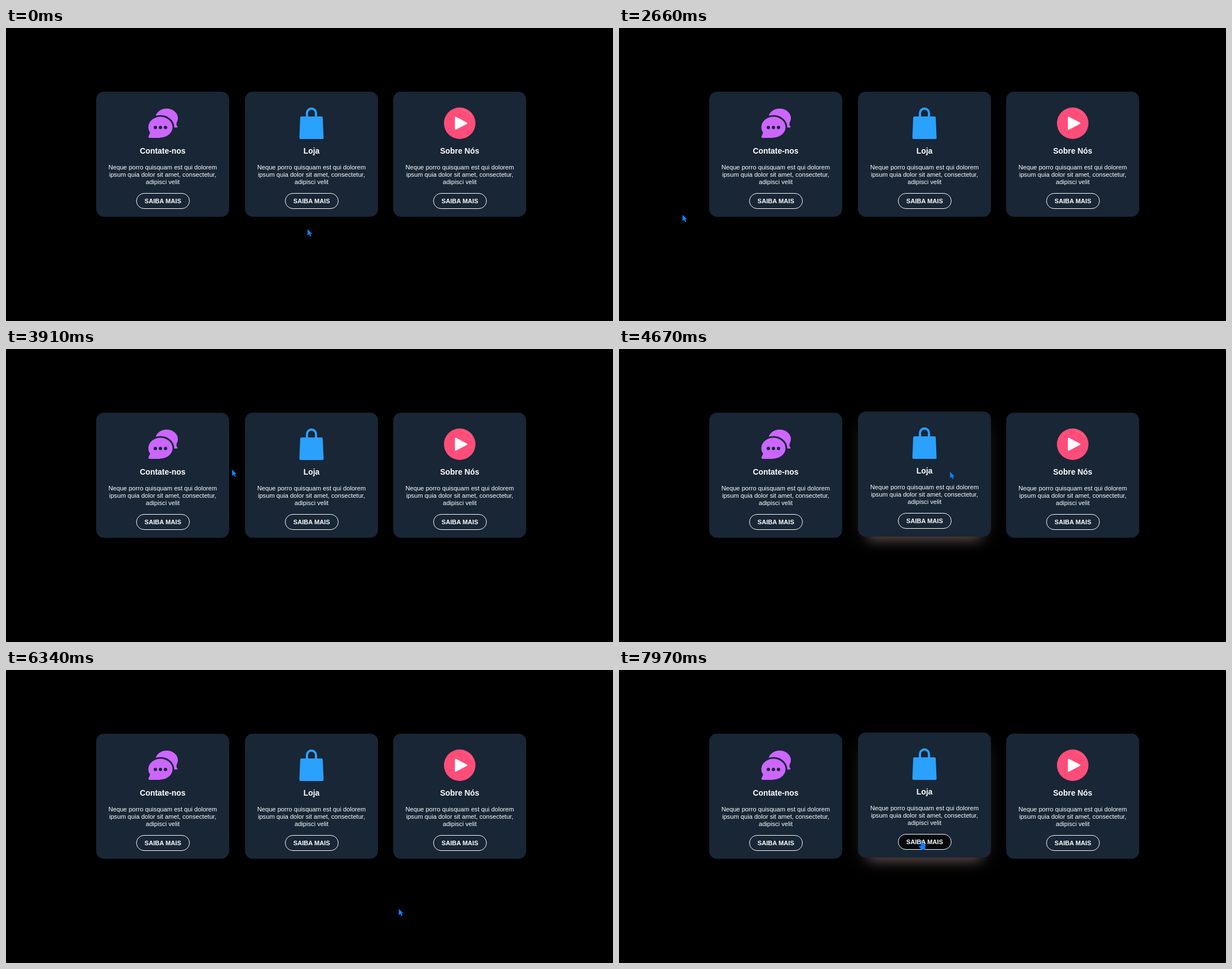
Recreate the animation shown at these times as an HTML page. Size 1077 by 520 pixels, loop 8000 ms.

```html
<!DOCTYPE html>
<html lang="pt">
<head>
<meta charset="utf-8">
<style>
  html, body { margin: 0; width: 100%; height: 100%; overflow: hidden; background: #000; }
  .card { position: absolute; top: 113px; width: 236px; height: 222px; border-radius: 14px; background: #182636; }
  .card svg { display: block; }
  text { font-family: "Liberation Sans", Arial, sans-serif; font-size: 11.15px; fill: #fff; text-anchor: middle; }
  .title { font-size: 13.9px; }
  .title, .label { font-weight: bold; }
  #pointer { position: absolute; left: 0; top: 0; z-index: 1; overflow: visible; }
</style>
</head>
<body>
<svg id="pointer" width="20" height="20" fill="#0a84ff">
  <path id="arrow" d="M0 0V11L3 9 5 13 6.500 12 5 8H8Z"/>
  <path id="hand" d="M-1.500 1Q0-1 1.500 1V5.500L6 7 7 9 6 17H0L-5 11Q-4 9-1.500 11Z"/>
</svg>
<script>
const LOOP = 8000, FADE = 200, SAMPLES = 16;
const CARD = { top: 113, width: 236, height: 222, step: 263.5 };
const BODY = ['Neque porro quisquam est qui dolorem', 'ipsum quia dolor sit amet, consectetur,', 'adipisci velit'];

// Icons are centred on x = 0
const chatIcon = `
  <g fill="#cc66ff">
    <ellipse cx="7" cy="47" rx="20" ry="17"/>
    <path d="M25 54Q23 59 27 63Q20 65 14 61Z"/>
    <ellipse cx="-4" cy="63" rx="21.500" ry="18.500" stroke="#182636" stroke-width="6" paint-order="stroke"/>
    <path d="M-22 72L-25 79Q-26 82-23 82H-4Z"/>
  </g>
  ${[-13, -4, 5].map(x => `<circle cx="${x}" cy="63.5" r="3" fill="#182636"/>`).join('')}`;

const bagIcon = `
  <g stroke="#2aa0ff" stroke-width="4" stroke-linejoin="round">
    <path d="M-8 50V38a8 8 0 0 1 16 0V50" fill="none"/>
    <path d="M-18 46H18L19.500 82H-19.500Z" fill="#2aa0ff"/>
  </g>`;

const playIcon = `
  <circle cy="56" r="28" fill="#ff4d79"/>
  <path d="M5 32Q16 35 22 45" fill="none" stroke="#ff7596"/>
  <path d="M-7 46V66L12 56Z" fill="#fff" stroke="#fff" stroke-width="3" stroke-linejoin="round"/>`;

// Pointer stops: time, x, y
const stops = [
  [0, 535, 357], [1750, 535, 357], [2150, 377, 414], [2540, 190, 408], [2660, 113, 332], [2800, 85, 250],
  [3420, 416, 214], [3910, 401, 214], [4670, 587, 218], [5000, 760, 226], [5320, 754, 220], [5890, 711, 286],
  [6340, 697, 424], [6640, 591, 400], [6850, 682, 365], [7410, 545, 309], [7820, 545, 309], [7970, 537, 302],
];

const cards = [['Contate-nos', chatIcon], ['Loja', bagIcon], ['Sobre Nós', playIcon]].map(([title, icon], i) => {
  const el = document.createElement('div');
  const left = 160 + i * CARD.step;
  el.className = 'card';
  el.style.left = left + 'px';
  el.innerHTML = `<svg width="236" height="222" viewBox="-118 0 236 222">${icon}
    <text class="title" y="110">${title}</text>
    ${BODY.map((line, row) => `<text y="${138.4 + row * 12.65}">${line}</text>`).join('')}
    <rect x="-46.500" y="180.500" width="94" height="27" rx="13.500" fill="#000" fill-opacity="0" stroke="#fff"/>
    <text class="label" x=".3" y="198">SAIBA MAIS</text></svg>`;
  document.body.append(el);
  return {
    el, button: el.querySelector('rect'),
    area: [left, CARD.top, CARD.width, CARD.height],
    buttonArea: [left + 71, CARD.top + 178, 95, 28],
  };
});
const pointer = document.getElementById('pointer');
const arrow = document.getElementById('arrow');
const hand = document.getElementById('hand');

const rate = (i, axis) => (stops[i + 1][axis] - stops[i][axis]) / (stops[i + 1][0] - stops[i][0]);

// Monotone slope: zero at turning points and rests, so the curve never overshoots
function slope(i, axis) {
  if (i === 0 || i === stops.length - 1) return 0;
  const before = rate(i - 1, axis), after = rate(i, axis);
  return before * after <= 0 ? 0 : 2 * before * after / (before + after);
}

function along(t, axis) {
  const next = stops.findIndex(stop => stop[0] > t);
  if (next < 1) return stops[next < 0 ? stops.length - 1 : 0][axis];
  const a = stops[next - 1], b = stops[next], span = b[0] - a[0], u = (t - a[0]) / span;
  return a[axis] + (b[axis] - a[axis]) * u * u * (3 - 2 * u)
    + span * u * (1 - u) * ((1 - u) * slope(next - 1, axis) - u * slope(next, axis));
}

function isOver([left, top, width, height], t) {
  const x = along(t, 1) - left, y = along(t, 2) - top;
  return x >= 0 && x <= width && y >= 0 && y <= height;
}

// Share of the last FADE milliseconds that the pointer spent over the area
function hover(area, t) {
  let hits = 0;
  for (let i = 0; i < SAMPLES; i++) hits += isOver(area, t - i * FADE / SAMPLES);
  return hits / SAMPLES;
}

function draw(now) {
  const t = now % LOOP;
  for (const { el, button, area, buttonArea } of cards) {
    const lift = hover(area, t);
    el.style.transform = `translateY(${-2 * lift}px)`;
    el.style.boxShadow = `0 12px 36px -10px rgba(235,200,190,${0.2 * lift}), 0 24px 20px -18px rgba(255,210,215,${0.25 * lift})`;
    button.setAttribute('fill-opacity', 0.8 * hover(buttonArea, t));
  }
  const onButton = cards.some(card => isOver(card.buttonArea, t));
  arrow.style.display = onButton ? 'none' : '';
  hand.style.display = onButton ? '' : 'none';
  pointer.style.transform = `translate(${along(t, 1)}px, ${along(t, 2)}px)`;
  requestAnimationFrame(draw);
}
requestAnimationFrame(draw);
</script>
</body>
</html>
```
